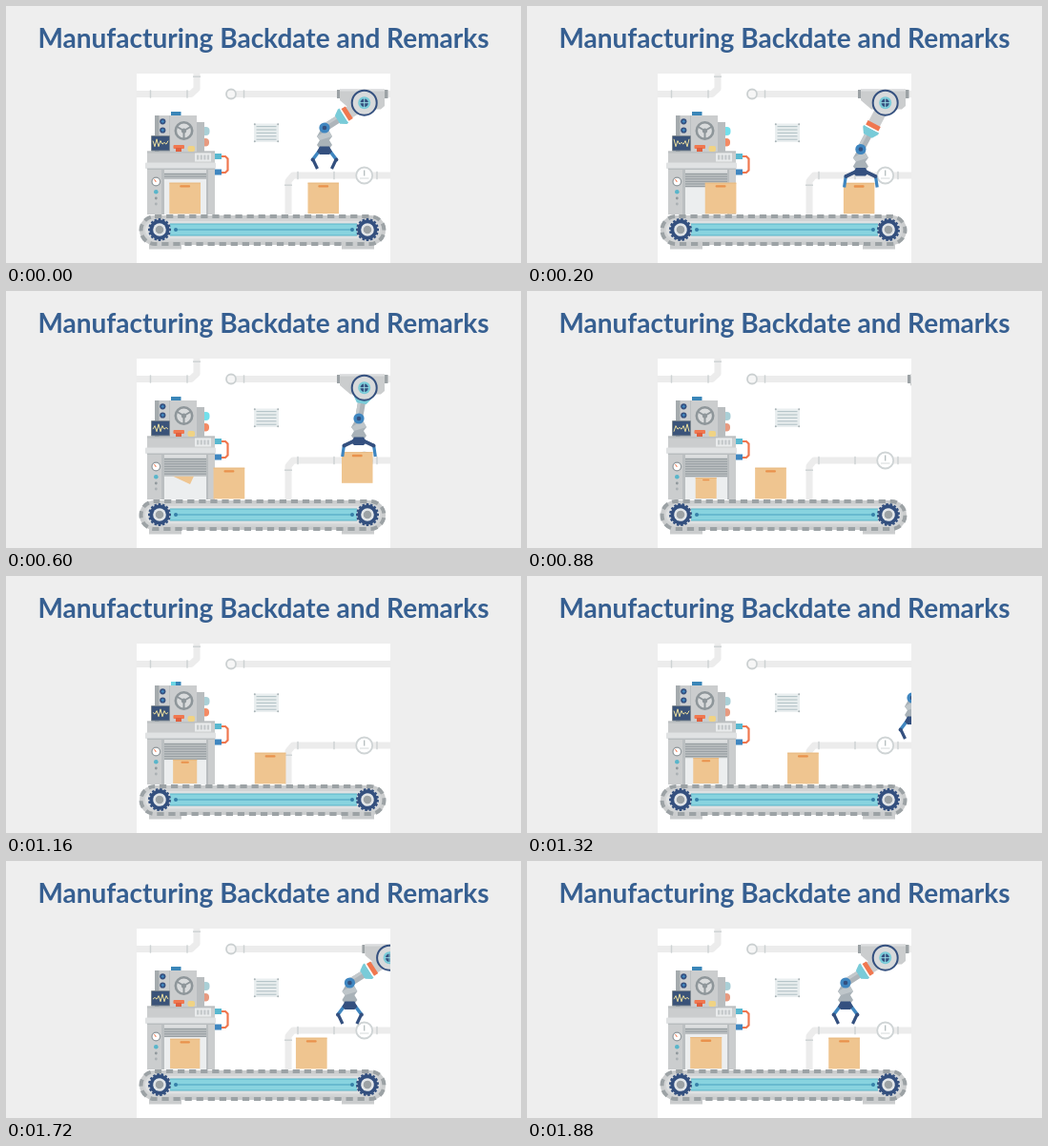
An HTML page with a canvas for the animation above (1.92 s loop, 540 px wide and 270 px high).

```html
<!DOCTYPE html>
<html lang="en">
<head>
<meta charset="utf-8">
<title>Manufacturing Backdate and Remarks</title>
<style>
html, body { margin: 0; width: 100%; height: 100%; overflow: hidden; background: #eee; }
canvas { position: absolute; left: 0; top: 0; }
h1 {
  position: absolute; left: 0; top: 16px; width: 540px; margin: 0;
  font: bold 28px/34px Lato, sans-serif; color: #365f91;
  text-align: center; white-space: nowrap;
}
</style>
</head>
<body>
<canvas id="stage" width="540" height="270"></canvas>
<h1>Manufacturing Backdate and Remarks</h1>
<script>
const g = document.getElementById('stage').getContext('2d');
const LOOP = 1920, STEP = 40, SPEED = 0.0771;
const NAVY = '#34507f', BLUE = '#3f86c0', TEAL = '#79cbd8', ORANGE = '#f0774f';
const STEEL = '#cbcdce', LIGHT = '#dcdedf', DARK = '#9ca2a5', PIPE = '#ececec';

function rect(x, y, w, h, color) {
  g.fillStyle = color;
  g.fillRect(x, y, w, h);
}
function round(x, y, w, h, r, color) {
  g.fillStyle = color;
  g.beginPath();
  g.roundRect(x, y, w, h, r);
  g.fill();
}
function disc(x, y, r, fill, stroke, width = 1) {
  g.beginPath();
  g.arc(x, y, r, 0, Math.PI * 2);
  if (fill) { g.fillStyle = fill; g.fill(); }
  if (stroke) { g.strokeStyle = stroke; g.lineWidth = width; g.stroke(); }
}
function trace(points) {
  g.beginPath();
  points.forEach(([x, y], i) => i ? g.lineTo(x, y) : g.moveTo(x, y));
}
function poly(points, color) {
  trace(points);
  g.fillStyle = color;
  g.fill();
}
function line(points, color, width = 1) {
  trace(points);
  g.strokeStyle = color;
  g.lineWidth = width;
  g.stroke();
}
// Piecewise linear track of [time, value] pairs
function track(t, keys) {
  for (let i = 1; i < keys.length; i++) {
    const [t0, a] = keys[i - 1], [t1, b] = keys[i];
    if (t <= t1) return a + (b - a) * Math.max(0, (t - t0) / (t1 - t0));
  }
  return keys[keys.length - 1][1];
}

function pipes() {
  g.lineJoin = 'round';
  line([[137, 92.5], [194, 92.5], [200, 87], [200, 71]], PIPE, 7);
  line([[238, 92.5], [403, 92.5]], PIPE, 7);
  line([[296, 219], [296, 184], [301, 178], [403, 178]], PIPE, 7);
  g.lineJoin = 'miter';
  for (const [x, y] of [[151.5, 92.5], [190, 92.5], [249.5, 92.5], [306, 178], [344, 178], [389, 178]])
    rect(x - 0.7, y - 4.2, 1.4, 8.4, '#cdd2d3');
  rect(196, 73.5, 8, 1.4, '#cdd2d3');
  rect(292, 187.5, 8, 1.4, '#cdd2d3');
  disc(236, 92.5, 5, '#f6f6f6', '#cbd0d1', 1.8);
  disc(375.7, 178, 8.5, '#fff', '#cfd4d5', 1.8);
  line([[375.7, 178.5], [375.7, 172.5]], '#b5bcbe', 1.3);
  line([[371, 181], [380.5, 181]], '#d5d9da', 1);
}

function vent() {
  rect(260, 123.5, 26, 19.5, '#e9eeef');
  for (let i = 0; i < 5; i++) rect(262.5, 126 + i * 3.4, 21, 1.2, '#b6c5c9');
  for (const x of [260.8, 285.2]) for (const y of [124.3, 142.2]) disc(x, y, 1, '#aab4b7');
}

function belt(t) {
  rect(150, 248, 34, 7.5, STEEL);
  rect(352, 248, 34, 7.5, STEEL);
  const pitch = (452 + Math.PI * 29) / 45;
  round(140, 220, 258, 31, 15.5, STEEL);
  g.beginPath();
  g.roundRect(141.5, 221, 255, 29, 14.5);
  g.strokeStyle = DARK;
  g.lineWidth = 4;
  g.setLineDash([pitch * 0.6, pitch * 0.4]);
  g.lineDashOffset = -t * SPEED;
  g.stroke();
  g.setLineDash([]);
  round(144, 223.5, 250, 24, 12, '#d2d4d5');
  round(146, 226, 246, 18.5, 9, '#dfe1e2');
  rect(172, 228.5, 196, 13, '#58b5ca');
  rect(172, 229.5, 196, 11, '#88d3df');
  line([[178, 235], [363, 235]], '#4aa2bf', 1.2);
  disc(178, 235, 2, '#347fa8');
  disc(363, 235, 2, '#347fa8');
  gear(161, 235, t);
  gear(379, 235, t);
}

function gear(x, y, t) {
  g.save();
  g.translate(x, y);
  g.rotate(t / LOOP * Math.PI * 4);
  for (let i = 0; i < 16; i++) {
    g.rotate(Math.PI / 8);
    rect(-1.3, -12, 2.6, 5, NAVY);
  }
  disc(0, 0, 10.6, NAVY);
  disc(0, 0, 6.8, '#e4e7e9');
  disc(0, 0, 4.3, DARK);
  g.restore();
}

function carton(x, y, size) {
  const k = size / 33;
  rect(x, y, size, size, '#efc590');
  rect(x, y, size, 0.8, '#e5b67c');
  round(x + 11 * k, y + 2.5 * k, 11 * k, 2.4 * k, 1, '#e9924c');
}

function machine(t) {
  const shut = t < 880 ? track(t, [[0, 182], [300, 194.5], [880, 195]])
                       : 195 - 13 * ((t - 880) / 1000) ** 1.5;
  // Opening with the roller shutter
  rect(165, 170, 46, 49, '#eceeef');
  rect(165, 170, 46, 6, LIGHT);
  rect(166, 175.5, 45, shut - 175.5, '#bcc0c2');
  for (let y = 176; y < shut - 0.8; y += 2.6) rect(166, y, 45, 1.1, '#969da1');

  // Legs and table
  rect(148, 170, 18, 49, STEEL);
  rect(163, 170, 3, 49, '#bbbfc1');
  rect(210, 170, 9, 49, STEEL);
  rect(210, 170, 2, 49, '#b9bdbf');
  rect(148, 152.5, 71, 13, STEEL);
  rect(148, 152.5, 71, 2, '#bcc0c2');
  round(146, 164.5, 74, 6.5, 1, '#e0e2e3');
  rect(148, 170.5, 71, 1.5, '#b9bdbf');
  disc(157.3, 184.5, 4.3, '#fff', '#8f979b', 1.2);
  line([[157.3, 185], [155.5, 182]], ORANGE, 1);
  disc(157.3, 195.3, 2.3, '#58b5ca');
  disc(157.3, 202, 1.4, '#8f979b');
  disc(157.3, 208, 1.4, '#aab0b3');

  // Upper cabinet
  const lit = t >= 200 && t < 700;
  round(205, 127, 8.5, 9, 4, lit ? '#72e0ec' : '#a9cfd6');
  round(205, 139, 8, 8.5, 4, lit || t > 1000 && t < 1300 ? '#f48a64' : '#e79a80');
  rect(200, 122, 8, 31, '#b9bdbf');
  rect(156, 115, 44, 38, STEEL);
  rect(156, 115, 4.5, 38, '#a5abae');
  rect(171, 115, 1, 38, '#bbbfc1');
  rect(173, 111, 10.5, 4, '#3a86b8');
  if (t > 1000 && t < 1300) rect(173, 111, 5, 4, '#6bd5e4');
  for (const y of [121.3, 130.5]) {
    disc(164.3, y, 3.1, NAVY);
    disc(164.3, y, 1.4, BLUE);
  }
  disc(186.5, 131, 8.7, '#d9dbdc', '#8e969a', 2.6);
  for (let i = 0; i < 3; i++) {
    const a = Math.PI / 2 + i * Math.PI * 2 / 3;
    line([[186.5, 131], [186.5 + 8 * Math.cos(a), 131 + 8 * Math.sin(a)]], '#8e969a', 2);
  }
  disc(186.5, 131, 2.6, '#8e969a');
  round(175.5, 146, 11.5, 4, 1, ORANGE);
  rect(178, 149, 6, 4, '#e0603f');
  round(190.5, 147, 7.5, 6, 2, '#f0d384');
  scope(t);

  // Keypad and side tube
  rect(198, 154.5, 17, 9, '#e9ebec');
  for (let i = 0; i < 4; i++) rect(200 + i * 3.6, 156.5, 2.3, 5, '#c5c9cb');
  line([[225, 158], [230, 158], [232.5, 160.5], [232.5, 172.5], [230, 175], [225, 175]], ORANGE, 2.2);
  rect(219, 155, 7, 6, '#58b8d0');
  rect(219, 171.5, 7, 6, BLUE);

  // Small carton dropping out of the press, then growing
  if (t > 480) {
    const size = track(t, [[880, 22], [1880, 33]]);
    g.save();
    g.beginPath();
    g.rect(166, t < 880 ? shut : 175, 45, 60);
    g.clip();
    g.translate(187.7, track(t, [[480, 168], [600, 188.4], [720, 207]]) - (size - 22) / 2);
    g.rotate(track(t, [[600, 25], [740, 0]]) * Math.PI / 180);
    carton(-size / 2, -size / 2, size);
    g.restore();
  }
}

function scope(t) {
  round(152, 136, 20, 16.5, 1, '#7d878f');
  rect(153, 137, 18, 14.5, '#3a5379');
  const points = [];
  const shift = Math.floor(t / 80);
  for (let i = 0; i < 9; i++) {
    const n = i + shift;
    points.push([154 + i * 2, 144 + (n % 2 ? 1 : -1) * (2.4 + 1.8 * Math.sin(n * Math.PI / 4))]);
  }
  line(points, '#ecdf9e', 1);
}

function housing() {
  rect(347, 88, 3, 9, DARK);
  rect(397, 88, 3.5, 9, DARK);
  poly([[350, 87.5], [397, 87.5], [397, 105], [393, 108.5], [361, 108.5], [350, 99]], STEEL);
  rect(350, 87.5, 47, 2, LIGHT);
  disc(375.7, 101.7, 13, '#d8dadb', NAVY, 2);
  disc(375.7, 101.7, 6.5, TEAL);
  disc(375.7, 101.7, 4.2, NAVY);
  line([[370.5, 101.7], [381, 101.7]], '#9bdbe4', 1);
  line([[375.7, 96.5], [375.7, 107]], '#9bdbe4', 1);
}

// Upper arm slides in and out of the housing; its local axis points to the shoulder
function upperArm(x, y) {
  g.save();
  g.translate(x, y);
  g.rotate(Math.atan2(101.7 - y, 375.7 - x) + Math.PI / 2);
  const reach = Math.hypot(101.7 - y, 375.7 - x);
  rect(-4, -18, 8, 18, '#aeb5ba');
  rect(-4, -18, 3, 18, '#c4c9cc');
  if (reach > 30) rect(-6.5, -reach, 13, reach - 29, STEEL);
  poly([[-5, -16], [5, -16], [9, -22], [9, -24], [-9, -24], [-9, -22]], TEAL);
  rect(-6.5, -25.5, 13, 1.5, '#fff');
  rect(-7.5, -30.5, 15, 5, ORANGE);
  g.restore();
}

function claw(x, y, open) {
  const mix = (a, b) => a + (b - a) * open;
  g.save();
  g.translate(x, y);
  poly([[-4, 2], [4, 2], [8, 9], [5, 13], [8, 18], [5, 22], [-5, 22], [-8, 18], [-5, 13], [-8, 9]], '#a9b2b8');
  poly([[-8, 9], [4, 2], [8, 9], [-5, 13]], '#bfc6ca');
  for (const s of [-1, 1]) {
    const kx = s * mix(12.5, 15.5), ky = mix(33.5, 28.5);
    line([[s * 5, 23.5], [kx, ky]], open > 0.5 ? NAVY : BLUE, 3.6);
    line([[kx, ky - 1], [s * mix(7.5, 17.3), mix(43, 40)]], open > 0.5 ? BLUE : NAVY, 3.2);
    disc(kx, ky, 1.9, NAVY);
  }
  poly([[-5, 19.5], [5, 19.5], [8, 25], [5, 28], [-5, 28], [-8, 25]], NAVY);
  disc(0, 0, 5.6, BLUE);
  disc(0, 0, 2.3, NAVY);
  g.restore();
}

function robot(t) {
  const back = t >= 1200;
  const shift = back ? 35 * (1 + Math.cos(Math.PI * track(t, [[1500, 0], [1880, 1]])))
              : t > 600 ? 52 * ((t - 600) / 280) ** 1.2 : 0;
  const pose = back ? 0 : t;
  const x = track(pose, [[0, 334], [200, 349.9], [400, 358.3], [600, 370]]);
  const y = track(pose, [[0, 128], [200, 150.5], [400, 143], [600, 134], [880, 132]]);
  const open = track(pose, [[40, 0], [160, 1]]);
  if (!back && t < 200) carton(316.5 + t * SPEED, 185.7, 32.5);
  g.save();
  g.translate(shift, 0);
  if (!back && t >= 200) carton(x - 18, y + 35.3, 32.5);
  upperArm(x, y);
  claw(x, y, open);
  housing();
  g.restore();
}

function draw(t) {
  rect(0, 0, 540, 270, '#eee');
  g.save();
  g.beginPath();
  g.rect(137, 71, 266, 199);
  g.clip();
  rect(137, 71, 266, 199, '#fff');
  pipes();
  vent();
  machine(t);
  belt(t);
  carton(171.3 + t * SPEED, 185.7, 32.7);
  robot(t);
  g.restore();
}

const start = performance.now();
function tick() {
  const t = (performance.now() - start) % LOOP;
  draw(Math.floor(t / STEP) * STEP);
  requestAnimationFrame(tick);
}
tick();
</script>
</body>
</html>
```
